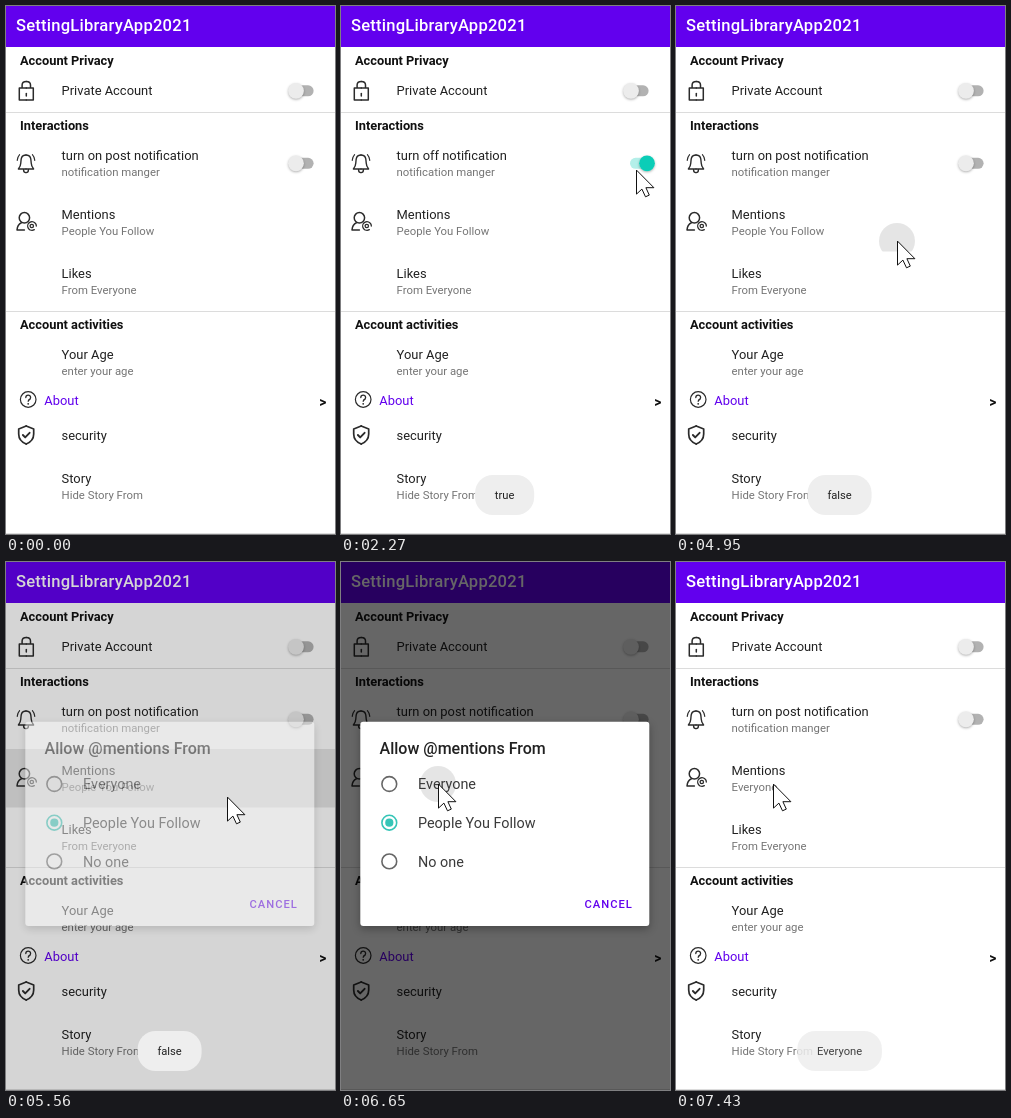
Write an HTML page with a canvas that moves like this. It is 329 by 528 pixels and loops after 8000 ms.

```html
<!DOCTYPE html>
<html lang="en">
<head>
<meta charset="utf-8">
<title>Settings screen</title>
<style>
  html, body { margin: 0; width: 100%; height: 100%; overflow: hidden; background: #fff; }
  canvas { display: block; width: 329px; height: 528px; }
</style>
</head>
<body>
<canvas id="stage"></canvas>
<script>
const W = 329, H = 528, LOOP = 8000;
const INK = '#212121', GREY = '#757575', LINE = '#2b2b2b', PURPLE = '#6200ee', TEAL = '#0bcdb7';
const dpr = window.devicePixelRatio || 1;

function setup(canvas) {
  canvas.width = W * dpr;
  canvas.height = H * dpr;
  const c = canvas.getContext('2d');
  c.scale(dpr, dpr);
  c.lineCap = c.lineJoin = 'round';
  return c;
}
const main = setup(document.getElementById('stage'));
const layer = setup(document.createElement('canvas'));
let ctx = main;

// --- time ---
const ramp = (t, start, length) => Math.min(1, Math.max(0, (t - start) / length));
const easeOut = p => 1 - (1 - p) ** 2;
const rise = (t, start, length) => easeOut(ramp(t, start, length));
const pulse = (t, on, off, length) => rise(t, on, length) - rise(t, off, length);

// The screen is sampled about 12.8 times a second and rests near the end.
function sample(t) {
  const step = 78.1;
  return t < 620 ? 0 : Math.min(7430, 634 + step * Math.floor((t - 620) / step));
}

// --- drawing helpers ---
function text(str, x, y, size, color = INK, weight = 400, spacing = 0) {
  ctx.font = `${weight} ${size}px Roboto, sans-serif`;
  ctx.letterSpacing = spacing + 'px';
  ctx.fillStyle = color;
  ctx.fillText(str, x, y);
}

function box(x, y, w, h, r, color) {
  ctx.beginPath();
  ctx.roundRect(x, y, w, h, r);
  ctx.fillStyle = color;
  ctx.fill();
}

function disc(x, y, r, color = LINE) {
  ctx.beginPath();
  ctx.arc(x, y, r, 0, Math.PI * 2);
  ctx.fillStyle = color;
  ctx.fill();
}

function ring(x, y, r, width, color = LINE, from = 0, to = Math.PI * 2) {
  ctx.beginPath();
  ctx.arc(x, y, r, from, to);
  ctx.strokeStyle = color;
  ctx.lineWidth = width;
  ctx.stroke();
}

function line(d, width = 1.5) {
  ctx.strokeStyle = LINE;
  ctx.lineWidth = width;
  ctx.stroke(new Path2D(d));
}

// Draws a left half and its mirror image.
function mirrored(d, width) {
  line(d, width);
  ctx.save();
  ctx.scale(-1, 1);
  line(d, width);
  ctx.restore();
}

function at(x, y, draw) {
  ctx.save();
  ctx.translate(x, y);
  draw();
  ctx.restore();
}

function withShadow(color, blur, dy, draw) {
  ctx.save();
  ctx.shadowColor = color;
  ctx.shadowBlur = blur * dpr;
  ctx.shadowOffsetY = dy * dpr;
  draw();
  ctx.restore();
}

// Fades a whole group as one flat picture.
function group(alpha, draw) {
  if (alpha <= 0) return;
  if (alpha >= 1) return draw();
  layer.clearRect(0, 0, W, H);
  ctx = layer;
  draw();
  ctx = main;
  ctx.globalAlpha = alpha;
  ctx.drawImage(layer.canvas, 0, 0, W, H);
  ctx.globalAlpha = 1;
}

// Touch feedback: a small spot that spreads, then fades on release.
function press(t, area, x, y, start, release) {
  const alpha = .1 * (1 - ramp(t, release, 180));
  if (t < start || !alpha) return;
  ctx.save();
  ctx.beginPath();
  ctx.roundRect(...area);
  ctx.clip();
  disc(x, y, 18 + 310 * ramp(t, start + 100, 250), `rgba(0,0,0,${alpha})`);
  ctx.restore();
}

// --- settings screen ---
function toggle(y, on) {
  group(1 - on, () => box(283, y - 5.5, 24.6, 11, 5.5, '#b2b2b2'));
  group(on, () => box(289, y - 5.5, 24.6, 11, 5.5, '#b4efe9'));
  const x = 290 + 16 * on;
  withShadow('rgba(0,0,0,.3)', 2.5, 1, () => disc(x, y, 7.9, '#ececec'));
  group(on, () => disc(x, y, 7.9, TEAL));
}

function icons() {
  at(20.3, 88, () => { // lock
    mirrored('M0 -6H-7V6H0M-4.2 -6V-9Q-4.2 -12.6 0 -12.6');
    line('M0 -.5V2');
  });
  at(20, 157, () => { // bell
    mirrored('M0 -8C-5 -8 -5 -4 -5.2 0Q-5.4 3.5 -7.6 6H0M-2.4 7Q-2.4 9.6 0 9.6', 1.4);
    mirrored('M-6.4 -8.4Q-8.6 -6 -8.8 -2.6', 1.1);
  });
  at(18.4, 211.8, () => { // person with an at sign
    ring(0, 0, 5.2, 1.5);
    line('M0 12.2H-7.4Q-7 6.6 -3 4.9');
    ring(7.6, 8.2, 4.3, 1.3, LINE, 1, 6.3);
    ring(7.4, 8.2, 1.7, 1.3);
  });
  at(22.2, 393.5, () => { // help
    ring(0, 0, 7.8, 1.2);
    ring(0, -2, 2.4, 1.3, LINE, Math.PI, Math.PI * 2.4);
    line('M0 1.8Q0 .8 1.5 0', 1.3);
    disc(0, 4.3, .9);
  });
  at(20.2, 429, () => { // shield
    mirrored('M0 -9L-7.5 -6V-1Q-7.5 6 0 9', 1.7);
    line('M-3.3 0L-1 2.4L3.4 -2.2', 1.9);
  });
}

function row(y, title, summary = '') {
  text(title, 55.6, y, 12.92);
  text(summary, 55.6, y + 15.9, 11.35, GREY);
}

function heading(y, str) {
  text(str, 14, y, 12.8, '#111', 700);
}

function screen(t) {
  box(0, 0, W, H, 0, '#fff');
  box(0, 0, W, 41, 0, PURPLE);
  text('SettingLibraryApp2021', 10, 25, 16.6, '#fff', 500, .21);
  for (const y of [106, 305, 527]) box(0, y, W, 1, 0, '#dcdcdc');

  press(t, [0, 127, W, 60, 0], 297, 166, 1490, 1860);
  press(t, [0, 127, W, 60, 0], 297, 166, 2960, 3250);
  press(t, [0, 187, W, 58.5, 0], 221, 235, 4840, 5556);

  const on = t > 1700 && t < 3130;
  const who = t < 7000 ? 'People You Follow' : 'Everyone';
  heading(59, 'Account Privacy');
  row(89.2, 'Private Account');
  heading(123.7, 'Interactions');
  row(154.2, on ? 'turn off notification' : 'turn on post notification', 'notification manger');
  row(213.2, 'Mentions', who);
  row(272.2, 'Likes', 'From Everyone');
  heading(322.5, 'Account activities');
  row(353, 'Your Age', 'enter your age');
  row(433.5, 'security');
  row(477, 'Story', 'Hide Story From');
  text('About', 38.3, 398.8, 12.9, PURPLE);
  text('>', 313.2, 401, 13.8, '#111', 700);
  toggle(84.8, 0);
  toggle(157.3, pulse(t, 1690, 3110, 200));
  icons();
}

function dialog(t) {
  withShadow('rgba(0,0,0,.3)', 9, 3, () => box(19.3, 159.8, 289, 204.2, 3, '#fff'));
  press(t, [51, 203, 226, 38, 3], 97, 222, 6640, LOOP);
  text('Allow @mentions From', 38.5, 191.5, 16, INK, 500);
  ['Everyone', 'People You Follow', 'No one'].forEach((label, i) => {
    const y = 222 + 38.7 * i, picked = i === 1, color = picked ? '#35c5b7' : '#666';
    ring(48.3, y, 7.4, 1.6, color);
    if (picked) disc(48.3, y, 4.1, color);
    text(label, 77, y + 5.2, 14.4, '#3a3a3a');
  });
  text('CANCEL', 243.5, 346, 11.2, PURPLE, 500, 1);
}

function toast(str, alpha) {
  group(alpha, () => {
    ctx.font = '400 11.2px Roboto, sans-serif';
    ctx.letterSpacing = '0px';
    const w = ctx.measureText(str).width, x = 163.6 - w / 2;
    box(x - 19.8, 469, w + 39.6, 40, 18, '#eeeeee');
    text(str, x, 493.2, 11.2, '#222');
  });
}

// --- pointer: each move is start, length, x, y ---
const MOVES = [
  [634, 156, 313, 218],
  [885, 296, 295.5, 164.5],
  [3900, 630, 221.5, 235.5],
  [5860, 390, 97.5, 233.5],
  [6340, 140, 97.5, 222.5],
];

function cursor(t) {
  if (t < 620) return;
  let x = 320, y = 337;
  for (const [start, length, toX, toY] of MOVES) {
    const p = ramp(t, start, length);
    x += (toX - x) * p;
    y += (toY - y) * p;
  }
  at(x, y, () => {
    const arrow = new Path2D('M0 0V23.6L5.4 18.6L9 26.3L12.8 24.6L9.4 17.2H17Z');
    ctx.fillStyle = '#fff';
    ctx.fill(arrow);
    ctx.strokeStyle = '#111';
    ctx.lineWidth = 1;
    ctx.stroke(arrow);
  });
}

function draw(t) {
  screen(t);
  const open = 5495, close = 6890, length = 215;
  const dim = .6 * (ramp(t, open, length) - ramp(t, close, length));
  box(0, 0, W, H, 0, `rgba(0,0,0,${dim})`);
  group(pulse(t, open, close, length), () => dialog(t));

  toast('true', pulse(t, 1830, 3700, 420));
  toast('false', pulse(t, 3700, 5690, 400));
  toast('Everyone', pulse(t, 7180, LOOP, 400));
  cursor(t);
}

function tick() {
  draw(sample(performance.now() % LOOP));
  requestAnimationFrame(tick);
}
tick();
</script>
</body>
</html>
```
